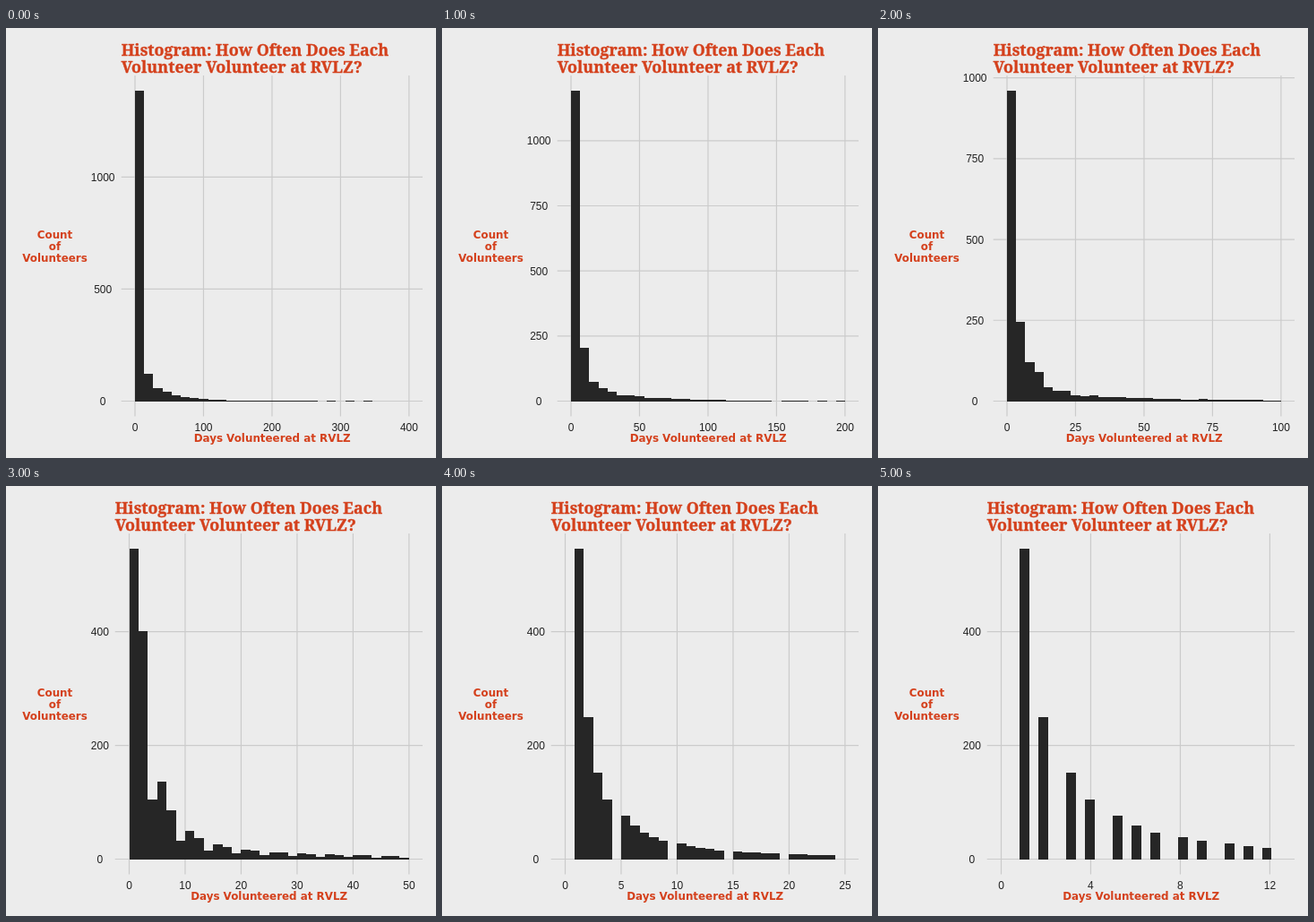
An HTML page for the animation above (6 s loop, 480 by 480 pixels).

```html
<!DOCTYPE html>
<html lang="en">
<head>
<meta charset="utf-8">
<title>Volunteer histogram</title>
<style>
  html, body { margin: 0; width: 100%; height: 100%; overflow: hidden; background: #ececec; }
  svg { display: block; width: 100vw; height: 100vh; }
  .title { font: bold 17.9px "Noto Serif", serif; fill: #d4401c; stroke: #d4401c; stroke-width: 0.35; }
  .label { font: bold 11.9px "DejaVu Sans", sans-serif; fill: #d4401c; text-anchor: middle; }
  .tick { font: 12px "Liberation Sans", Arial, sans-serif; fill: #222; text-anchor: middle; }
  .grid { stroke: #cbcbcb; stroke-width: 1.2; fill: none; }
  .bars { fill: #262626; shape-rendering: crispEdges; }
</style>
</head>
<body>
<svg viewBox="0 0 480 480"></svg>
<script>
const STEP = 1000, BINS = 30;
const RIGHT = 465, DATA_RIGHT = 449.9, ZERO_Y = 416.5, PEAK_HEIGHT = 346.5;
const HEADROOM = 1.045; // tallest y tick relative to the peak bar
const ORG = "RVLZ";

// Volunteers who came on exactly d days: many casual ones plus a steady core
const volunteers = d => 537 * Math.exp(-0.11 * (d - 1)) / d + 9 * Math.exp(-d / 40);

const people = [];
for (let d = 1; d < 147; d++) people.push({ d, n: volunteers(d) });
// Beyond that, single regulars ever further apart
for (let d = 157; d < 345; d += d < 170 ? 6.5 : d < 260 ? 13.3 : 26.6) people.push({ d, n: 1 });

function histogram(xMax) {
  const bins = Array(BINS).fill(0);
  for (const { d, n } of people) {
    const bin = Math.floor(d * BINS / xMax);
    if (bin < BINS) bins[bin] += n;
  }
  return bins;
}

const wide = { left: 128.7, zero: 144, tickX: 108.2 };
const narrow = { left: 121.7, zero: 137.5, tickX: 104.8, peak: 546, yStep: 200 };
const charts = [
  { ...wide, xMax: 400, xStep: 100, peak: 1385, yStep: 500 },
  { ...wide, xMax: 200, xStep: 50, peak: 1192, yStep: 250 },
  { ...wide, xMax: 100, xStep: 25, peak: 960, yStep: 250 },
  { ...narrow, xMax: 50, xStep: 10 },
  { ...narrow, xMax: 25, xStep: 5 },
  { ...narrow, xMax: 12.5, xStep: 4 }
];

const text = (cls, x, y, s) => `<text class="${cls}" x="${x}" y="${y}">${s}</text>`;

function drawChart({ left, zero, tickX, xMax, xStep, peak, yStep }) {
  const xAt = part => zero + (DATA_RIGHT - zero) * part;
  let grid = "", ticks = "", shapes = "";

  for (let v = 0; v <= xMax; v += xStep) {
    const x = xAt(v / xMax);
    grid += `M${x} 53V433.5`;
    ticks += text("tick", x, 450, v);
  }
  for (let v = 0; v < peak * HEADROOM; v += yStep) {
    const y = ZERO_Y - PEAK_HEIGHT * v / peak;
    grid += `M${left} ${y}H${RIGHT}`;
    ticks += text("tick", tickX, y + 4.6, v);
  }

  const bins = histogram(xMax);
  const scale = PEAK_HEIGHT / Math.max(...bins);
  const edge = i => Math.round(xAt(i / BINS));
  bins.forEach((n, i) => {
    if (!n) return;
    const h = Math.round(n * scale + 0.5);
    shapes += `M${edge(i)} 417v${-h}H${edge(i + 1)}v${h}z`;
  });

  return `<g visibility="hidden"><path class="grid" d="${grid}"/>
    <path class="bars" d="${shapes}"/>${ticks}
    ${text("title", left, 31, "Histogram: How Often Does Each")}
    ${text("title", left, 50, `Volunteer Volunteer at ${ORG}?`)}
    ${text("label", (left + RIGHT) / 2 + 0.3, 462, `Days Volunteered at ${ORG}`)}</g>`;
}

const svg = document.querySelector("svg");
svg.innerHTML = charts.map(drawChart).join("") +
  ["Count", "of", "Volunteers"].map((s, i) => text("label", 54.5, 235 + 13 * i, s)).join("");
const groups = [...svg.querySelectorAll("g")];

const start = performance.now();
function render() {
  const elapsed = Math.max(0, performance.now() - start);
  const current = Math.floor(elapsed / STEP) % charts.length;
  groups.forEach((g, i) => g.setAttribute("visibility", i === current ? "visible" : "hidden"));
  requestAnimationFrame(render);
}
render();
</script>
</body>
</html>
```
